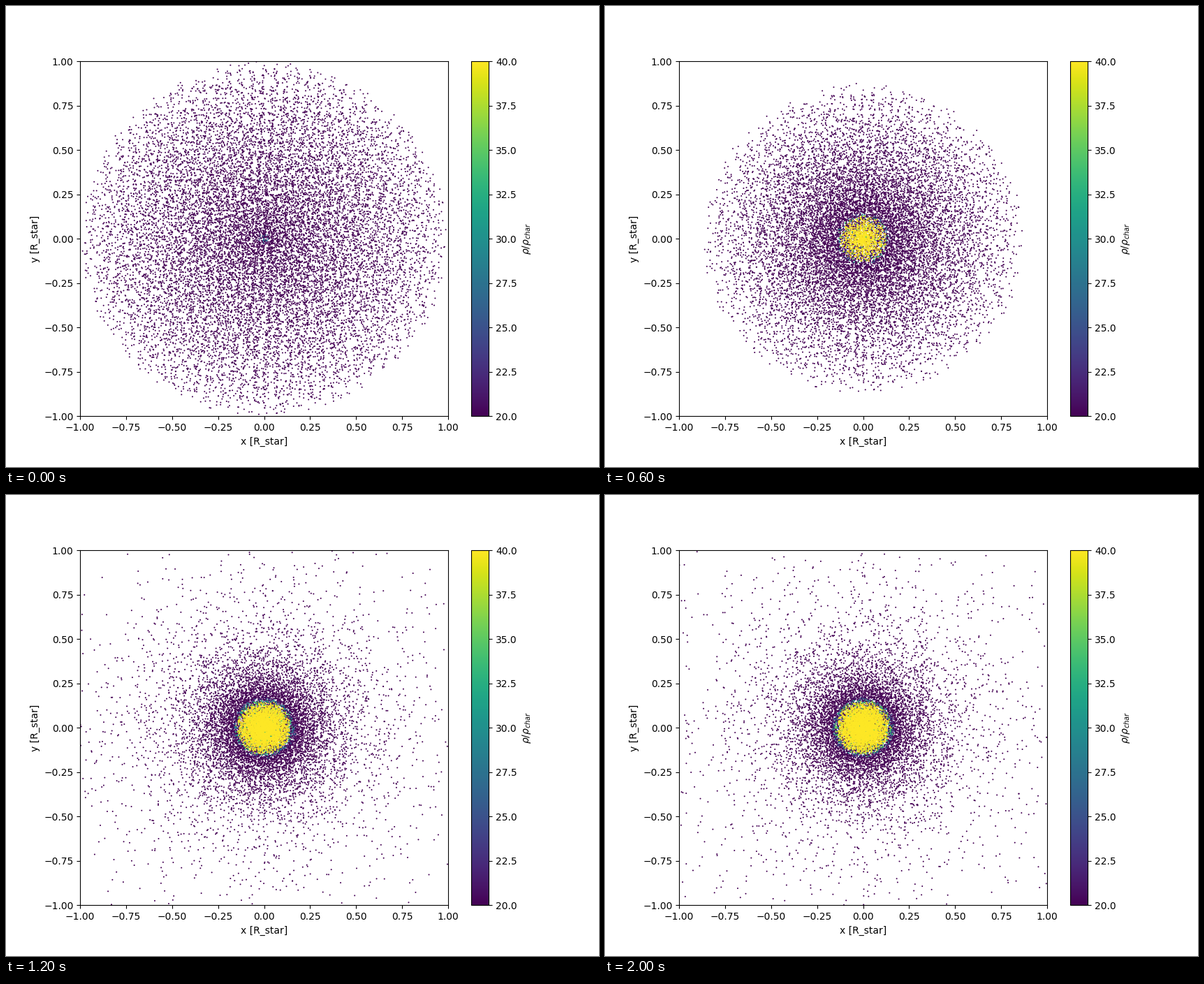
A matplotlib script that plays this animation: 849x660 px, repeating every 2200 ms.

```python
import numpy as np
import matplotlib.pyplot as plt
from matplotlib.animation import FuncAnimation

W, H, DPI = 849, 660, 100
STEPS, INTERVAL = 11, 200
BOUNCE = 6
rng = np.random.default_rng(7)


def make_ball(gap=0.064, shake=0.24):
    """Tilted, shaken cubic lattice in the unit sphere: directions and mass."""
    axis = np.arange(-16, 17) * gap
    pts = np.stack(np.meshgrid(axis, axis, axis), -1).reshape(-1, 3)
    tilt, _ = np.linalg.qr(rng.normal(size=(3, 3)))
    pts = pts @ tilt + rng.normal(0, shake * gap, pts.shape)
    dist = np.linalg.norm(pts, axis=1)
    keep = dist < 1
    return pts[keep] / dist[keep, None], dist[keep] ** 3


direction, mass = make_ball()
grain = np.exp(rng.normal(0, 0.1, mass.size))
depth = rng.normal(0, 15, mass.size)


def outer_radius(step):
    if step < BOUNCE:
        return 1 - 0.0137 * step ** 2
    return 1.35 + 0.42 * (step - BOUNCE)


def radius(step):
    """Power law in mass that grows a compact core as the knee shrinks."""
    knee = 10 ** np.interp(step, [0, 2, 3, 4, 6, 10],
                           [1.7, 0.8, 0.2, -1.1, -1.25, -1.9])
    power = 0.5 + 0.05 * min(step, 2)
    return outer_radius(step) * (knee * mass / (1 + knee - mass)) ** power


def density(step, r):
    core = np.interp(step, [0, 1, 2, 4, 6], [0.03, 0.033, 0.072, 0.203, 0.158])
    return np.minimum(30 * (core / r) ** 4 * grain, 27 + 4 * step ** 3)


def state(step):
    r = radius(step)
    rho = density(step, r)
    order = np.argsort(np.clip(rho, 10, 45) + depth)
    return (direction[:, :2] * r[:, None])[order], rho[order]


fig, ax = plt.subplots(figsize=(W / DPI, H / DPI), dpi=DPI)
fig.subplots_adjust(left=106.2 / W, right=764.6 / W, bottom=0.11, top=0.88)
xy, rho = state(0)
dots = ax.scatter(xy[:, 0], xy[:, 1], c=rho, s=2.1, linewidths=0,
                  cmap="viridis", vmin=20, vmax=40)
ax.set(xlim=(-1, 1), ylim=(-1, 1), xlabel="x [R_star]", ylabel="y [R_star]")
bar = fig.colorbar(dots, ax=ax)
bar.set_label(r"$\rho/\rho_{char}$")


def update(step):
    xy, rho = state(step)
    dots.set_offsets(xy)
    dots.set_array(rho)
    return (dots,)


anim = FuncAnimation(fig, update, frames=STEPS, interval=INTERVAL,
                     repeat=True, repeat_delay=0)
plt.show()
```
